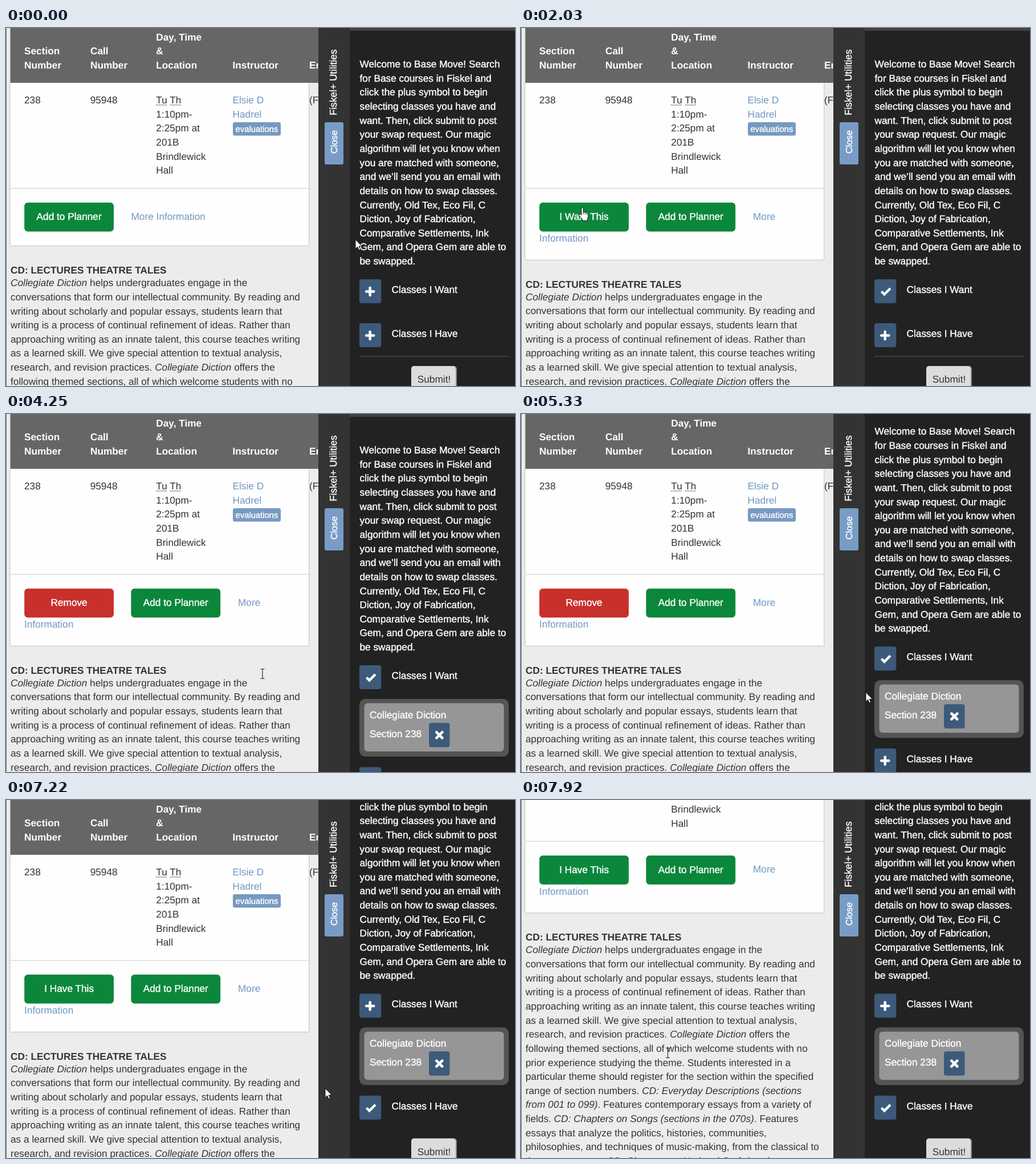
Animation of 893 by 627 pixels, one loop 8000 ms. Source, as an HTML page:

```html
<!DOCTYPE html>
<html lang="en">
<head>
<meta charset="utf-8">
<title>Class exchange</title>
<style>
  html, body { margin: 0; width: 100%; height: 100%; overflow: hidden; background: #222; }
  svg { display: block; width: 893px; height: 627px; }
  text { font: 17.25px "Liberation Sans", Arial, sans-serif; fill: #333; white-space: pre; text-rendering: geometricPrecision; }
  .b { font-weight: bold; }
  .i { font-style: italic; }
  .w { fill: #fff; stroke: #fff; stroke-width: .4px; }
  .head { fill: #fff; font-weight: bold; }
  .link { fill: #7097c2; }
  .mid { text-anchor: middle; }
  .small { font-size: 14.8px; }
  .tab { font-size: 16px; }
</style>
</head>
<body>
<svg id="stage" viewBox="0 0 893 627"></svg>
<script>
const LOOP = 8000, LINE = 24.65;
const GREEN = '#0b873c', RED = '#c8302c', NAVY = '#3d5a7b', SKY = '#789cc6';

const intro = `Welcome to Base Move! Search
for Base courses in Fiskel and
click the plus symbol to begin
selecting classes you have and
want. Then, click submit to post
your swap request. Our magic
algorithm will let you know when
you are matched with someone,
and we’ll send you an email with
details on how to swap classes.
Currently, Old Tex, Eco Fil, C
Diction, Joy of Fabrication,
Comparative Settlements, Ink
Gem, and Opera Gem are able to
be swapped.`;

// Asterisks mark italics.
const about = `*Collegiate Diction* helps undergraduates engage in the
conversations that form our intellectual community. By reading and
writing about scholarly and popular essays, students learn that
writing is a process of continual refinement of ideas. Rather than
approaching writing as an innate talent, this course teaches writing
as a learned skill. We give special attention to textual analysis,
research, and revision practices. *Collegiate Diction* offers the
following themed sections, all of which welcome students with no
prior experience studying the theme. Students interested in a
particular theme should register for the section within the specified
range of section numbers. *CD: Everyday Descriptions (sections*
*from 001 to 099)*. Features contemporary essays from a variety of
fields. *CD: Chapters on Songs (sections in the 070s)*. Features
essays that analyze the politics, histories, communities,
philosophies, and techniques of music-making, from the classical to
the contemporary. *CD: Chapters on National Craft (sections*`;

const text = (x, y, s, cls = '') => {
  const body = s.split('*').map((p, i) => i % 2 ? `<tspan class="i">${p}</tspan>` : p).join('');
  return `<text x="${x}" y="${y}" class="${cls}">${body}</text>`;
};
const lines = (x, y, s, cls) => s.split('\n').map((l, i) => text(x, y + i * LINE, l, cls)).join('');
const rect = (x, y, w, h, fill, r = 0, more = '') =>
  `<rect x="${x}" y="${y}" width="${w}" height="${h}" rx="${r}" fill="${fill}" ${more}/>`;
const path = (d, more) => `<path d="${d}" ${more}/>`;
const group = (id, body) => `<g id="${id}">${body}</g>`;

const button = (x, label, fill) =>
  rect(x, 305.7, 156.8, 50.7, fill, 6) + text(x + 78.4, 336.4, label, 'w mid');

const stroke = (w, cap = 'round') => `fill="none" stroke="#fff" stroke-width="${w}" stroke-linecap="${cap}"`;
const plus = (x, y) => path(`M${x - 6.5} ${y}h13M${x} ${y - 6.5}v13`, stroke(4.6));
const check = (x, y) => path(`M${x - 7.5} ${y + .5}l5 5L${x + 8} ${y - 5}`, stroke(4.4, 'butt'));
const cross = (x, y) => path(`M${x - 5} ${y - 5}l10 10m0 -10l-10 10`, stroke(4.6));

const toggle = (id, y, label) =>
  rect(620, y, 38.3, 42, NAVY, 4) +
  group(id + 'Plus', plus(638.7, y + 21.5)) + group(id + 'Check', check(640, y + 21)) +
  text(676.5, y + 24, label, 'w');

const page =
  rect(7.5, 95.8, 523.5, 285, '#fefefe', 0, 'id="sheet" style="filter:drop-shadow(0 .5px 1.3px #0006)"') +
  rect(7.5, 0, 540.5, 96, '#666') +
  lines(32, 46.3, 'Section\nNumber', 'head') + lines(148, 46.3, 'Call\nNumber', 'head') +
  lines(263.3, 21.7, 'Day, Time\n&amp;\nLocation', 'head') +
  text(397.5, 71, 'Instructor', 'head') + text(532, 71, 'Enr', 'head') +
  rect(8, 280.3, 523, 1.2, '#d4d4d4') +
  text(32, 132.3, '238') + text(147.7, 132.3, '95948') +
  text(263.3, 132.3, 'Tu Th') +
  path('M263 134.8h20M288 134.8h20', 'stroke="#333" stroke-width="1.2" stroke-dasharray="1.3 1.2"') +
  lines(263.3, 156.8, '1:10pm-\n2:25pm at\n201B\nBrindlewick\nHall') +
  lines(397.5, 132.3, 'Elsie D\nHadrel', 'link') +
  rect(398, 165, 84, 23.5, '#7699c2', 3.5) + text(440, 181.6, 'evaluations', 'w small mid') +
  text(532, 132.3, '(Full)') +
  group('single', button(32.2, 'Add to Planner', GREEN) + text(219.5, 335.6, 'More Information', 'link')) +
  group('double',
    group('wantBtn', button(32.2, 'I Want This', GREEN)) +
    group('removeBtn', button(32.2, 'Remove', RED)) +
    group('haveBtn', button(32.2, 'I Have This', GREEN)) +
    button(219.4, 'Add to Planner', GREEN) +
    text(407, 335.6, 'More', 'link') + text(32, 374.2, 'Information', 'link')) +
  group('below', text(8, 430.2, 'CD: LECTURES THEATRE TALES', 'b') + lines(8, 452.2, about));

const side =
  rect(603, 0, 290, 5, '#424242') +
  lines(620.5, 69, intro, 'w') +
  toggle('want', 440, 'Classes I Want') +
  group('card',
    rect(620, 499, 262, 101, '#555', 10) + rect(628.5, 506.5, 245, 84.5, '#969696', 6) +
    text(638, 533, 'Collegiate Diction', 'w') + text(638, 566, 'Section 238', 'w') +
    rect(742, 541, 36.5, 42.5, NAVY, 4) + cross(760.3, 562.3)) +
  group('lower',
    toggle('have', 517, 'Classes I Have') +
    group('rule', rect(620, 574.5, 262, 1.2, '#505050')) +
    rect(711, 592, 80, 46, '#8a8a8a', 5) + rect(711, 592, 78, 44, '#dcdcdc', 5) +
    text(751, 621, 'Submit!', 'mid'));

const ink = 'fill="#fff" stroke="#111" stroke-width="1" stroke-linejoin="round"';
const pointers =
  group('arrow', path('M0 0V16.2L3.7 12.8 6.2 18.6 8.8 17.5 6.3 11.8H11.6Z', ink)) +
  group('hand',
    path('M5 13.5V2.2a1.7 1.7 0 0 1 3.4 0V9q.3-1.2 1.6-1.1 1.4.1 1.5 1.5.4-.9 1.5-.7 1.2.2 1.3 1.6.4-.7 1.3-.5 1.2.3 1.2 1.9V16q0 3-1.6 5v2.5H6.5V21L.9 14.2q-.9-1.3.2-2.1 1.2-.7 2.2.4z', ink) +
    path('M8.4 9v3.5M11.5 9.5v3M14.3 10.5v2.5', 'stroke="#111" stroke-width=".9"')) +
  group('beam', path('M-3.5 -8.5h2.5l1 1 1 -1h2.5M0 -7.5v15M-3.5 8.5h2.5l1 -1 1 1h2.5', 'fill="none" stroke="#222" stroke-width="1.1"'));

document.getElementById('stage').innerHTML =
  '<clipPath id="leftHalf"><rect width="548" height="627"/></clipPath>' +
  '<clipPath id="rightHalf"><rect x="603" width="290" height="627"/></clipPath>' +
  rect(0, 0, 548, 627, '#ecedeb') +
  `<g clip-path="url(#leftHalf)">${group('page', page)}</g>` +
  rect(0, 0, 1, 627, '#666') +
  rect(548, 0, 55.5, 627, '#333') +
  '<g transform="translate(580 153) rotate(-90)">' + text(0, 0, 'Fiskel+ Utilities', 'w') + '</g>' +
  rect(559, 165, 33, 74, SKY, 3) +
  '<g transform="translate(580.7 220) rotate(-90)">' + text(0, 0, 'Close', 'w tab') + '</g>' +
  rect(603.5, 0, 289.5, 627, '#222') +
  `<g clip-path="url(#rightHalf)">${group('side', side)}</g>` +
  group('pointer', pointers);

const $ = id => document.getElementById(id);
const show = (id, on) => { $(id).style.display = on ? '' : 'none'; };
const move = (id, x, y) => $(id).setAttribute('transform', `translate(${x} ${y})`);

// start ms, pointer, x, y
const pointerSteps = [
  [0, 'arrow', 613, 370.5], [150, 'arrow', 616, 385], [280, 'arrow', 624, 412],
  [410, 'hand', 632, 443], [530, 'hand', 640, 458], [660, 'hand', 643, 462],
  [1640, 'arrow', 560, 405], [1770, 'beam', 300, 318], [1900, 'arrow', 150, 282],
  [2030, 'hand', 101, 314], [2160, 'hand', 92, 320], [2300, 'hand', 83, 325],
  [3110, 'hand', 241.5, 346.5], [3260, 'beam', 440, 425], [3400, 'arrow', 590, 482],
  [3540, 'arrow', 626, 496], [3970, 'arrow', 575, 470], [4110, 'beam', 480, 443],
  [4250, 'beam', 450, 455], [4780, 'beam', 417, 455], [4910, 'beam', 508, 470],
  [5050, 'arrow', 605, 487.5], [5870, 'arrow', 608, 498], [6000, 'arrow', 613, 515],
  [6120, 'arrow', 618, 527], [6250, 'arrow', 620, 531.5],
  [6560, 'hand', 626, 532], [6710, 'hand', 632, 533],
  [7110, 'arrow', 560, 505], [7240, 'beam', 390, 466], [7370, 'beam', 257.5, 443]
];
// start ms, offset
const sideScroll = [[0, 0], [5330, 32.7], [5480, 72], [5610, 94], [5740, 100.7]];
const pageScroll = [[0, 0], [7490, 38], [7620, 91], [7770, 162], [7920, 208.5]];

const at = (table, t) => table.reduce((a, row) => row[0] <= t ? row : a);

function draw(t) {
  const wide = t >= 1370, card = t >= 2550, removable = t >= 2700, having = t >= 6980;
  show('single', !wide);
  show('double', wide);
  show('wantBtn', !removable);
  show('removeBtn', removable && !having);
  show('haveBtn', having);
  $('sheet').setAttribute('height', wide ? 310 : 285);
  move('below', 0, wide ? LINE : 0);

  const wanting = wide && !having;
  show('wantPlus', !wanting);
  show('wantCheck', wanting);
  show('havePlus', !having);
  show('haveCheck', having);
  show('card', card);
  show('rule', !card);
  move('lower', 0, card ? 101.5 : 0);

  move('page', 0, -at(pageScroll, t)[1]);
  move('side', 0, -at(sideScroll, t)[1]);
  const [, kind, x, y] = at(pointerSteps, t);
  for (const k of ['arrow', 'hand', 'beam']) show(k, k === kind);
  move('pointer', x, y);
}

function tick() {
  draw(performance.now() % LOOP);
  requestAnimationFrame(tick);
}
tick();
</script>
</body>
</html>
```
